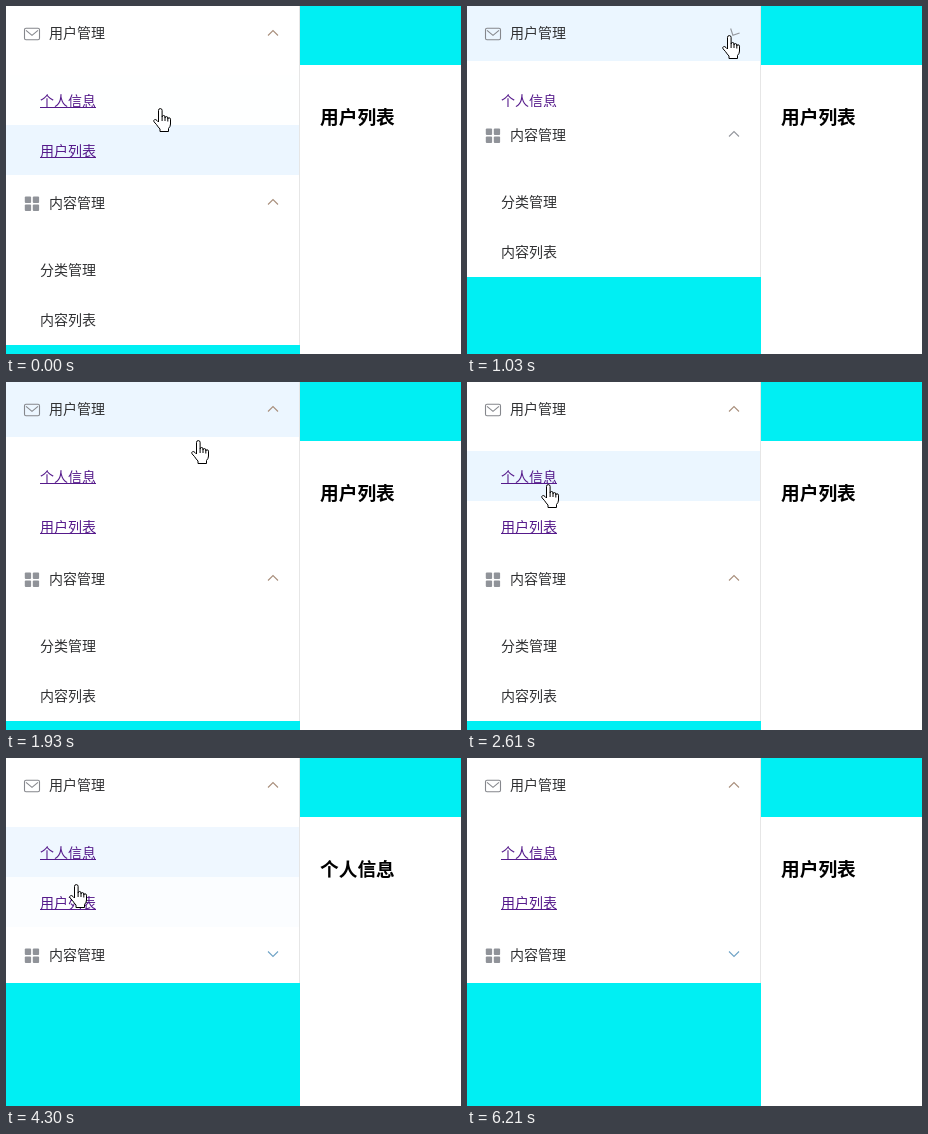
Animation, 455 px wide and 348 px high, one loop 6.46 s. Source, as an HTML page:

```html
<!DOCTYPE html>
<html lang="zh-CN">
<head>
<meta charset="utf-8">
<style>
  html, body { margin: 0; width: 100%; height: 100%; overflow: hidden; background: #fff; }
  svg { display: block; }
  text { font: 14px "Noto Sans CJK SC", "Noto Sans CJK", sans-serif; fill: #303133; }
  .link { fill: #551a8b; }
  .link text { fill: inherit; }
  #heading { font-size: 18.72px; font-weight: bold; fill: #000; }
  .hover { fill: #ebf6ff; }
  .line { fill: none; stroke: #85878c; stroke-width: 1.1; }
</style>
</head>
<body>
<svg id="stage" width="455" height="348" viewBox="0 0 455 348"></svg>
<script>
const LOOP = 6460, FADE = 300, ROW = 50, GAP = 14, HEAD = 56;
const SUB = GAP + 2 * ROW;

// Clicks: close and reopen the first section, then follow each link
const CLOSE = 862, REOPEN = 1360, LINK_1 = 3430, LINK_2 = 4820, PRESS = 80;

// Pointer legs: from, until, left, top
const start = [150, 130];
const legs = [
  [-10, 0, 147, 102],
  [0, 680, 255, 29],
  [1400, 1530, 260, 27],
  [1700, 2270, 76, 103],
  [2560, 2980, 62, 95],
  [4050, 4300, 63, 126],
  [4300, 4570, 62, 137],
  [5240, 6200, 432, 341],
];

const mail = `<g class="line"><rect x="18.5" y="23.3" width="15" height="11.4" rx="1.5"/>
  <path d="M20 25.3l6 5 6-5"/></g>`;
const tiles = [0, 1, 2, 3].map(i => `<rect x="${18.8 + i % 2 * 8}" y="${21.6 + (i >> 1) * 8}"
  width="6.3" height="6.3" rx="1" fill="#909399"/>`).join('');

const row = (n, label, i, linked) => `
  <g transform="translate(0 ${GAP + ROW * i})">
    <rect class="hover" id="row${n}-${i}" width="293" height="${ROW}" opacity="0"/>
    <g id="item${n}-${i}" class="${linked ? 'link' : ''}">
      <text x="34" y="${linked ? 31 : 30}">${label}</text>
      ${linked ? '<rect x="34" y="32" width="56" height="1"/>' : ''}
    </g>
  </g>`;

const section = (n, icon, title, labels, linked) => `
  <g id="section${n}" transform="translate(0 -1)">
    <rect class="hover" id="head${n}" width="293" height="${HEAD}" opacity="0"/>
    ${icon}
    <text x="43" y="33">${title}</text>
    <path class="line" id="chevron${n}" d="M-5-2.5L0 2.5 5-2.5"/>
    <svg id="sub${n}" y="${HEAD}" width="293" overflow="hidden">
      ${labels.map((label, i) => row(n, label, i, linked)).join('')}
    </svg>
  </g>`;

const $ = id => document.getElementById(id);
$('stage').innerHTML = `
  <rect width="455" height="348" fill="#00eff3"/>
  <rect x="294" y="59" width="161" height="289" fill="#fff"/>
  <text id="heading" x="314" y="118"></text>
  <rect id="menu" width="294" fill="#fff"/>
  <rect id="border" x="293" width="1" fill="#e6e6e6"/>
  ${section(0, mail, '用户管理', ['个人信息', '用户列表'], true)}
  ${section(1, tiles, '内容管理', ['分类管理', '内容列表'], false)}
  <g id="pointer" fill="#fff" stroke="#000" stroke-linejoin="round">
    <path id="hand" d="M5.5 14V2.4a1.8 1.8 0 0 1 3.6 0V9q0-1.5 1.5-1.5T12 9v1q0-1.4 1.4-1.4T14.8 10v1q0-1.2 1.3-1.2t1.4 1.4V16q0 2.5-2 4.5V23.5H7V21Q5 19 3.6 16.7L1 13.8Q.3 12.3 1.5 11.7T4 12.5zM9.1 9v4M12 10v3M14.8 11v2.5"/>
    <path id="arrow" d="M.5.5V16l3.6-3.4 2.4 5.6 2.3-1-2.4-5.4h5z"/>
  </g>`;

const clamp = x => Math.min(1, Math.max(0, x));
const smooth = x => x * x * (3 - 2 * x);
const easeOut = x => 1 - (1 - x) ** 2.3;

function pointerAt(t) {
  let [x, y] = start;
  for (const [from, until, toX, toY] of legs) {
    const k = clamp((t - from) / (until - from));
    x += (toX - x) * k;
    y += (toY - y) * k;
  }
  return [x, y];
}

// Name of the menu entry under the fingertip
function entryAt(t) {
  const [x, y] = pointerAt(t);
  const rowTop = HEAD - 1 + GAP, secondTop = rowTop + 2 * ROW;
  if (x > 287 || y >= secondTop + HEAD) return '';
  if (y >= secondTop) return 'head1';
  if (y >= rowTop) return 'row0-' + Math.floor((y - rowTop) / ROW);
  return y < HEAD ? 'head0' : '';
}

// Highlights fade, so average the hover state over the recent past
function glow(id, t) {
  const samples = 20;
  let hits = 0;
  for (let i = 0; i < samples; i++) hits += entryAt(t - i * FADE / samples) === id;
  return hits / samples;
}

// How far a section is open when it closes and reopens at the given times
const openness = (t, closeAt, reopenAt, ease) => t < reopenAt
  ? 1 - ease(clamp((t - closeAt) / FADE))
  : ease(clamp((t - reopenAt) / FADE));

function draw(now) {
  const t = now % LOOP;

  const toggles = [[CLOSE, REOPEN], [LINK_1 + PRESS, Infinity]];
  const heights = toggles.map(([a, b]) => Math.floor(SUB * openness(t, a, b, smooth)));
  const moving = heights.some(h => h > 0 && h < SUB);
  toggles.forEach(([a, b], n) => {
    const turn = openness(t, a, b, easeOut);
    $('sub' + n).setAttribute('height', heights[n]);
    $('chevron' + n).setAttribute('transform', `translate(267 ${28 - n}) rotate(${180 * turn})`);
    $('chevron' + n).style.stroke = moving ? '#94979d' : turn ? '#a98f7c' : '#6fa3c6';
  });
  const secondTop = HEAD - 1 + heights[0], bottom = secondTop + HEAD + heights[1];
  $('section1').setAttribute('transform', `translate(0 ${secondTop})`);
  $('menu').setAttribute('height', bottom);
  $('border').setAttribute('height', bottom);

  for (const id of ['head0', 'row0-0', 'row0-1', 'head1'])
    $(id).setAttribute('opacity', glow(id, t));

  [LINK_1, LINK_2].forEach((click, i) => {
    $('item0-' + i).style.fill = t >= click && t < click + PRESS ? 'red' : '';
  });
  $('heading').textContent =
    t >= LINK_1 + PRESS && t < LINK_2 + PRESS ? '个人信息' : '用户列表';

  const [x, y] = pointerAt(t);
  const onMenu = x < 288 && y < bottom;
  $('pointer').setAttribute('transform', `translate(${Math.round(x)} ${Math.round(y)})`);
  $('pointer').setAttribute('visibility', t < 6200 ? 'visible' : 'hidden');
  $('hand').style.display = onMenu ? '' : 'none';
  $('arrow').style.display = onMenu ? 'none' : '';
}

const begin = performance.now();
function tick() {
  draw(performance.now() - begin);
  requestAnimationFrame(tick);
}
tick();
</script>
</body>
</html>
```
